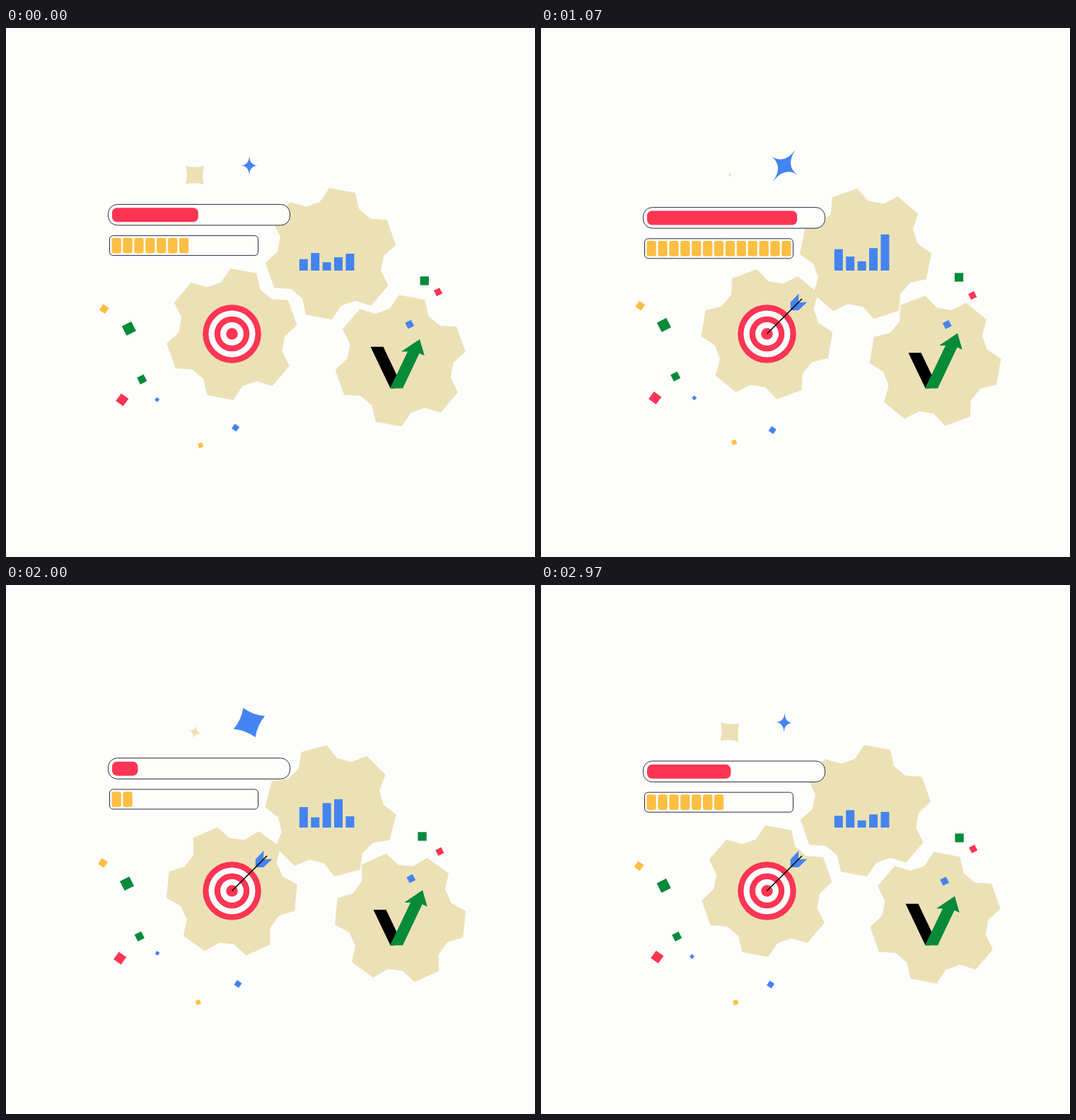
These frames come from a looping animation (748 px wide and 748 px high, 3.01 s). An HTML page with a canvas:

```html
<!DOCTYPE html>
<html lang="en">
<head>
<meta charset="utf-8">
<title>Gears and goals</title>
<style>
  html, body { margin: 0; height: 100%; overflow: hidden; background: #fdfdfc; }
  canvas { display: block; width: 100vw; height: 100vh; }
</style>
</head>
<body>
<canvas width="748" height="748"></canvas>
<script>
const g = document.querySelector('canvas').getContext('2d');
const LOOP = 3010, TAU = Math.PI * 2, DEG = Math.PI / 180;
const PAPER = '#fdfdfc', CREAM = '#ece1b5', RED = '#fc3554', BLUE = '#4484f0',
  GREEN = '#058a3a', YELLOW = '#fcbf43';

const clamp = v => Math.max(0, Math.min(1, v));
const ramp = (t, a, b) => clamp((t - a) / (b - a));
const ease = u => u * u * (3 - 2 * u);
// Swings between -1 and 1, highest at the peak time
const wave = (t, peak, beats = 1) => Math.cos((t - peak) / LOOP * TAU * beats);

function poly(color, points) {
  g.fillStyle = color;
  g.beginPath();
  points.forEach(p => g.lineTo(...p));
  g.closePath();
  g.fill();
}

function box(x, y, w, h, r, fill, stroke) {
  g.beginPath();
  g.roundRect(x, y, w, h, r);
  g.fillStyle = fill;
  g.fill();
  if (!stroke) return;
  g.strokeStyle = stroke;
  g.lineWidth = 1;
  g.stroke();
}

function at(x, y, degrees, draw) {
  g.save();
  g.translate(x, y);
  g.rotate(degrees * DEG);
  draw();
  g.restore();
}

function gear(x, y, turn) {
  const points = [];
  for (let tooth = 0; tooth < 6; tooth++)
    for (const [r, a] of [[75, -22], [93, -11.6], [93, 11.6], [75, 22]]) {
      const angle = (tooth * 60 + a) * DEG;
      points.push([r * Math.cos(angle), r * Math.sin(angle)]);
    }
  at(x, y, turn - 79.6, () => poly(CREAM, points));
}

// Out at a steady pace, back faster, then rest
function gears(t) {
  const turn = 51.4 * (ramp(t, 0, 1793) - ramp(t, 1793, 2430));
  gear(459, 319.3, turn);
  gear(319.3, 433, -turn);
  gear(557.5, 470.5, -turn);
}

function star(x, y, turn, rx, ry, pinch, color) {
  at(x, y, turn, () => {
    const cx = rx * pinch * Math.SQRT1_2, cy = ry * pinch * Math.SQRT1_2;
    g.fillStyle = color;
    g.beginPath();
    g.moveTo(0, -ry);
    g.quadraticCurveTo(cx, -cy, rx, 0);
    g.quadraticCurveTo(cx, cy, 0, ry);
    g.quadraticCurveTo(-cx, cy, -rx, 0);
    g.quadraticCurveTo(-cx, -cy, 0, -ry);
    g.fill();
  });
}

function stars(t) {
  const pinch = peak => 0.52 * ((1 + wave(t, peak)) / 2) ** 2;
  const small = 11 + 8 * wave(t, 2800);
  star(267, 208, 45 - 180 * t / LOOP, small, small, pinch(2990), CREAM);
  const big = 20.2 + 7.3 * wave(t, 1450), stretch = 0.1 * wave(t, 1100);
  star(344, 194.5, -180 * (t / LOOP) ** 1.15, big * (1 + stretch), big * (1 - stretch), pinch(2100), BLUE);
}

function progress(t) {
  const age = (t - 1570 + LOOP) % LOOP;
  const y = 5.4 * Math.sin(t / LOOP * TAU);
  box(144.5, 249.4 + y, 257, 29.5, 13, PAPER, '#2b2b38');
  const w = Math.min(246, age * 0.0845);
  if (w > 0.5) box(150, 254.3 + y, w, 20, Math.min(7, w / 2), RED);
  box(146.5, 293.6 + y, 210, 28, 5, PAPER, '#2b2b38');
  const cells = Math.min(13, Math.floor(age / 193));
  for (let i = 0; i < cells; i++) box(149.5 + i * 15.9, 296.8 + y, 13.3, 21.7, 3, YELLOW);
}

function chart(t) {
  const heights = [
    26 + 10 * wave(t, 800, 2),
    20 + 6 * wave(t, 300),
    21 + 14 * wave(t, 550, 2),
    31.5 + 13 * wave(t, 700, 2),
    30.5 + 22 * wave(t, 900)
  ];
  g.fillStyle = BLUE;
  heights.forEach((h, i) => g.fillRect(414.8 + i * 16.4, 343 - h, 12, h));
}

function target() {
  for (let ring = 5; ring > 0; ring--) {
    g.fillStyle = ring % 2 ? RED : PAPER;
    g.beginPath();
    g.arc(319.5, 432.5, ring * 8.26, 0, TAU);
    g.fill();
  }
}

function dart(t) {
  const u = Math.min(1, (t - 570) / 200);
  const x = 595.5 - 276 * u, y = 188.5 + 276 * (0.55 * u + 0.334 * u * u);
  at(x, y, -23.8 - 21.2 * clamp(u), () => {
    poly(BLUE, [[47, 0], [55, -8], [72, -8.5], [63, 0], [72, 8.5], [55, 8]]);
    g.strokeStyle = '#000';
    g.lineWidth = 1.6;
    g.beginPath();
    g.moveTo(0, 0);
    g.lineTo(70, 0);
    g.stroke();
  });
}

// Short arm shrinks while the arrow arm grows
function tick(t) {
  const p = ease(ramp(t, 770, 1000)) * (1 - ease(ramp(t, 2120, 2600)));
  const dx = 4 * p, dy = 8.5 * p;
  poly('#000', [[515.5 + dx, 450.8 + dy], [533.5 + dx, 450.8 + dy], [554, 494], [550, 509.5], [543.5, 509.5]]);
  poly(GREEN, [
    [543, 509.5], [568 + dx, 457.5 - dy], [559 + dx, 457.5 - dy], [585 + dx, 440 - dy],
    [591.7 + dx, 463.3 - dy], [584.5 + dx, 460 - dy], [561, 509.5]
  ]);
}

// Each square circles slowly around its place, lowest at the given time
function square(t, color, size, angle, x, y, low) {
  at(x + 2 * wave(t, low + LOOP / 4), y + 2.8 * wave(t, low), angle, () => {
    g.fillStyle = color;
    g.fillRect(-size / 2, -size / 2, size, size);
  });
}

function confetti(t) {
  square(t, YELLOW, 10, 35, 138.7, 394.5, 0);
  square(t, GREEN, 15, -27, 173, 422.5, 2800);
  square(t, GREEN, 10.5, -27, 190.5, 495.5, 2500);
  square(t, RED, 13, 36, 162.3, 525.5, 2300);
  square(t, BLUE, 5, 36, 214.8, 523.2, 300);
  square(t, BLUE, 8, 35, 326.5, 566, 900);
  square(t, YELLOW, 6.5, -20, 273.4, 588.7, 2500);
  square(t, GREEN, 12.3, 0, 590.5, 355.2, 2700);
  square(t, RED, 9, -27, 611.4, 376, 1400);
  square(t, BLUE, 9.5, -27, 572.5, 418, 550);
}

function frame(now) {
  const t = now % LOOP;
  g.fillStyle = PAPER;
  g.fillRect(0, 0, 748, 748);
  for (const draw of [gears, stars, progress, chart, target, tick, confetti, dart]) draw(t);
}

const start = performance.now();
(function loop() {
  frame(performance.now() - start);
  requestAnimationFrame(loop);
})();
</script>
</body>
</html>
```
